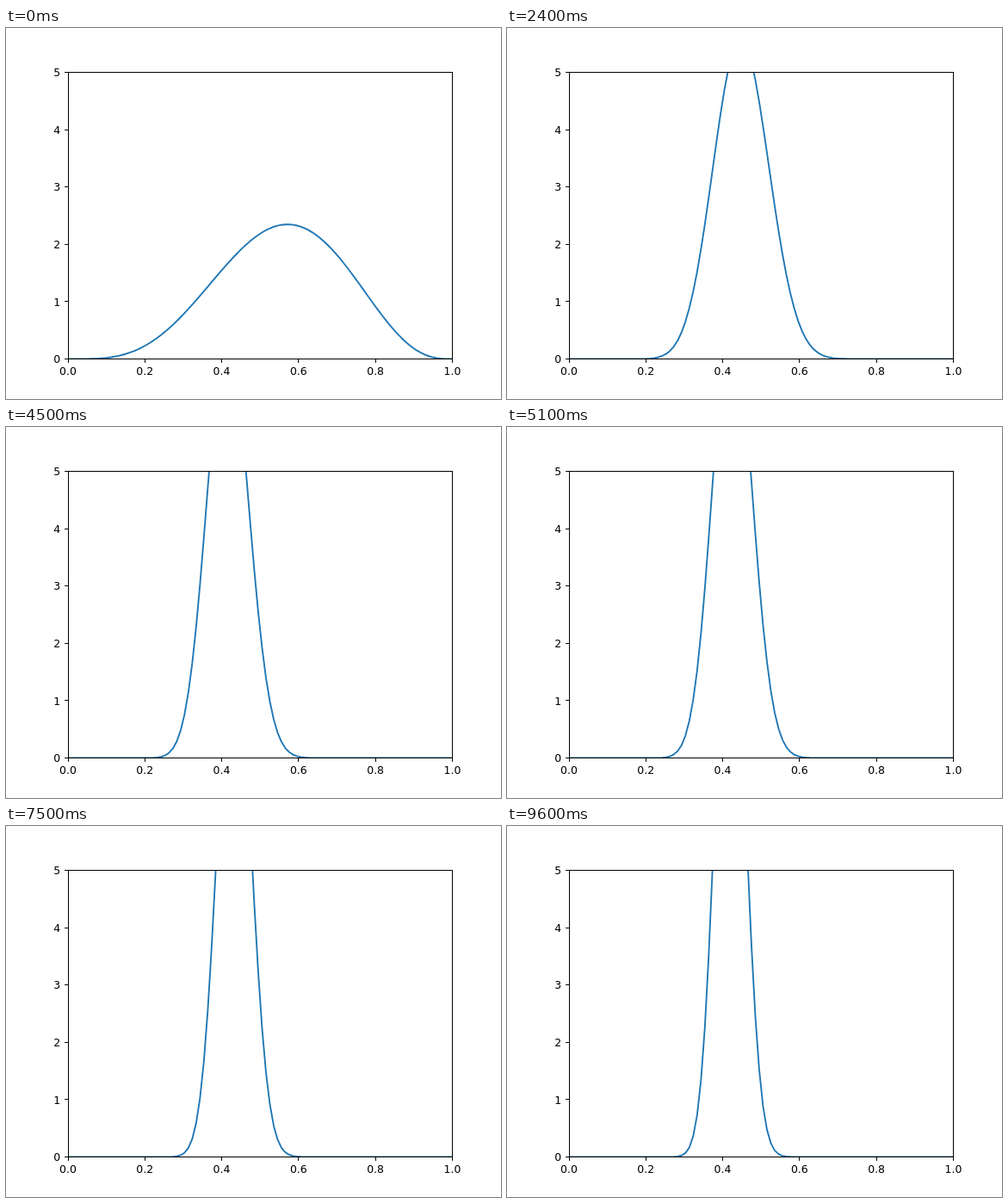
An HTML page with a canvas that plays this animation: 575x431 px, repeating every 9.9 s.

```html
<!DOCTYPE html>
<html>
<head>
<meta charset="utf-8">
<style>
html, body { margin: 0; width: 575px; height: 431px; overflow: hidden; background: #fff; }
canvas { display: block; }
</style>
</head>
<body>
<canvas id="stage" width="575" height="431"></canvas>
<script>
const ctx = document.getElementById('stage').getContext('2d');
const STEP = 300, BATCH = 5, POINTS = 100;
// Successes in each batch of five trials; the prior is Beta(2, 2).
const wins = [...'303232223222112323334311212123122'].map(Number);
const px = x => 72 + 446.4 * x;
const py = y => 384.48 - 66.528 * y;
const crisp = v => Math.floor(v) + 0.5;

function logFactorial(n) {
  let sum = 0;
  for (let i = 2; i <= n; i++) sum += Math.log(i);
  return sum;
}

function betaCurve(a, b) {
  const scale = logFactorial(a + b - 1) - logFactorial(a - 1) - logFactorial(b - 1);
  return x => x <= 0 || x >= 1 ? 0
    : Math.exp(scale + (a - 1) * Math.log(x) + (b - 1) * Math.log(1 - x));
}

function line(x1, y1, x2, y2) {
  ctx.beginPath();
  ctx.moveTo(x1, y1);
  ctx.lineTo(x2, y2);
  ctx.stroke();
}

function drawCurve(step) {
  const a = wins.slice(0, step + 1).reduce((sum, w) => sum + w, 2);
  const density = betaCurve(a, 4 + BATCH * (step + 1) - a);
  ctx.save();
  ctx.beginPath();
  ctx.rect(72, 52, 446, 332);
  ctx.clip();
  ctx.beginPath();
  for (let i = 0; i < POINTS; i++) {
    const x = i / (POINTS - 1);
    ctx.lineTo(px(x), py(density(x)));
  }
  ctx.strokeStyle = '#1f77b4';
  ctx.lineWidth = 1.875;
  ctx.lineJoin = 'round';
  ctx.stroke();
  ctx.restore();
}

function drawAxes() {
  const left = crisp(px(0)), right = crisp(px(1));
  const top = crisp(py(5)), bottom = crisp(py(0));
  ctx.strokeStyle = ctx.fillStyle = '#000';
  ctx.lineWidth = 1;
  ctx.strokeRect(left, top, right - left, bottom - top);
  ctx.font = '12.5px "DejaVu Sans", sans-serif';
  for (let i = 0; i <= 5; i++) {
    const x = crisp(px(i / 5)), y = crisp(py(i));
    line(x, bottom, x, bottom + 4.4);
    line(left, y, left - 4.4, y);
    ctx.textAlign = 'center';
    ctx.fillText((i / 5).toFixed(1), px(i / 5), 403);
    ctx.textAlign = 'right';
    ctx.fillText(i, 63.25, Math.round(py(i) + 4.6));
  }
}

function draw(now) {
  ctx.fillStyle = '#fff';
  ctx.fillRect(0, 0, 575, 431);
  drawCurve(Math.floor(now / STEP) % wins.length);
  drawAxes();
}

function tick() {
  draw(performance.now());
  requestAnimationFrame(tick);
}
tick();
</script>
</body>
</html>
```
